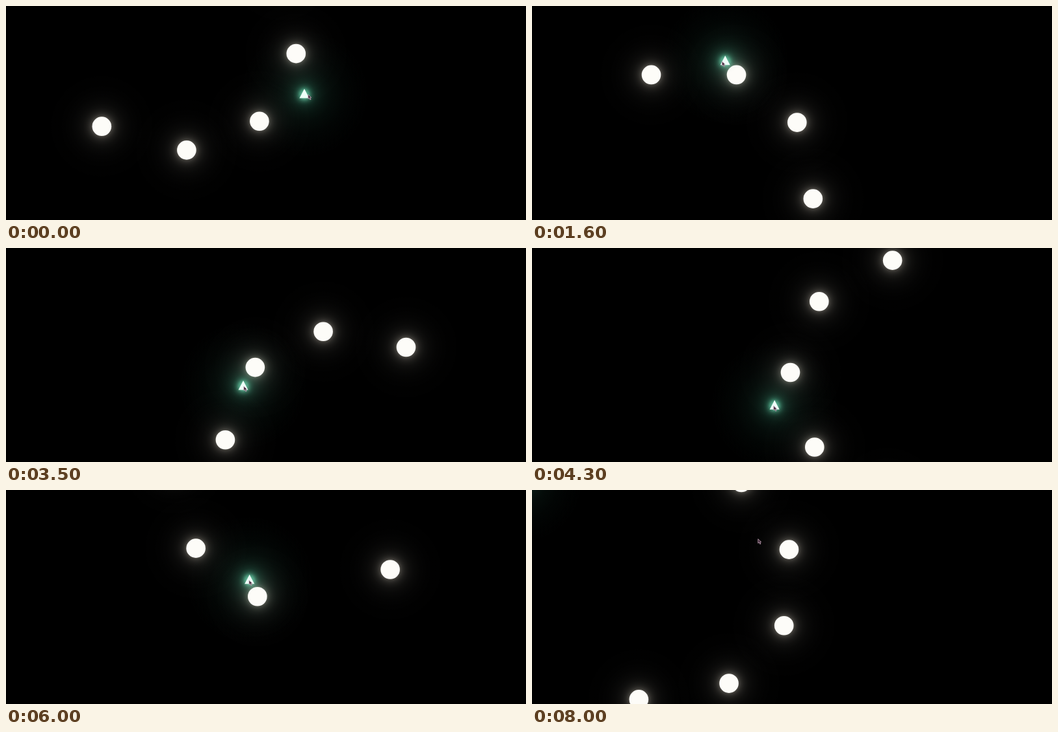
An HTML page with a canvas that plays this animation: 800 by 331 pixels, repeating every 8.1 s.

```html
<!DOCTYPE html>
<html lang="en">
<head>
<meta charset="utf-8">
<title>Orbs</title>
<style>
  html, body { margin: 0; width: 100%; height: 100%; overflow: hidden; background: #000; }
  canvas { display: block; width: 800px; height: 331px; }
</style>
</head>
<body>
<canvas id="stage" width="800" height="331"></canvas>
<script>
const ctx = document.getElementById('stage').getContext('2d');
const LOOP = 8100, STEP = 100;

// Orbs fly straight through one point, each turned a little from the last.
const CX = 400, CY = 168.5, RADIUS = 14.8;
const SPEED = 299, GAP = 0.4, TURN = 20;
const REACH_X = 256, REACH = 300;
const FIRST = { head: 116, time: 0.353, from: -3, to: 14 };
const SECOND = { head: 166.6, time: 6.656, from: 0, to: 6 };

// The ship follows the pointer until an orb knocks it away.
const AIM = [[0, 459, 136], [0.3, 484, 142], [1, 350, 76], [2.3, 274, 119],
  [3.5, 365, 213], [5.1, 369, 238], [6.7, 375, 64], [8.1, 348, 76]];
const KNOCK = 6.1, SLOWED = 6.3;

const rad = deg => deg * Math.PI / 180;

// smooth path through unevenly timed points
function aimAt(t) {
  let i = 0;
  while (i < AIM.length - 2 && t >= AIM[i + 1][0]) i++;
  const a = AIM[i], b = AIM[i + 1];
  const before = AIM[i - 1] || a, after = AIM[i + 2] || b;
  const d = b[0] - a[0], u = (t - a[0]) / d;
  return [1, 2].map(n => {
    const m0 = d * (b[n] - before[n]) / (b[0] - before[0]);
    const m1 = d * (after[n] - a[n]) / (after[0] - a[0]);
    const ease = u * u * (3 - 2 * u);
    return a[n] + (b[n] - a[n]) * ease + u * (u - 1) * ((u - 1) * m0 + u * m1);
  });
}

function shipAt(t) {
  const [x, y] = aimAt(Math.min(t, KNOCK)), s = Math.max(0, t - KNOCK);
  return [x - 208 * s, y - 23.5 * s - 26.7 * s * s];
}

function pointerAt(t) {
  return [aimAt(t + 0.06)[0] + 1, aimAt(t)[1] + 5];
}

function orbsAt(t) {
  const orbs = [];
  const lag = 9 * Math.exp(-(((t - 4) / 1.1) ** 2));
  for (const run of [FIRST, SECOND]) {
    for (let k = run.from; k <= run.to; k++) {
      const late = run === FIRST && k === run.to ? Math.max(0, t - SLOWED) : 0;
      const a = rad(run.head - TURN * k);
      const s = (t - late - run.time - GAP * k) * SPEED - lag;
      const x = Math.cos(a) * s - 129 * late, y = Math.sin(a) * s - 12 * late;
      if (Math.abs(x) < REACH_X && Math.abs(s) < REACH) orbs.push([CX + x, CY + y]);
    }
  }
  return orbs;
}

// light that fades with distance to the given power
function glow(x, y, r, rgb, gain, power) {
  const g = ctx.createRadialGradient(x, y, 0, x, y, r);
  for (let u = 0.05; u <= 1; u += 0.025) {
    g.addColorStop(u, `rgba(${rgb},${Math.min(0.6, gain * (1 - u) / u ** power)})`);
  }
  g.addColorStop(1, `rgba(${rgb},0)`);
  ctx.fillStyle = g;
  ctx.fillRect(x - r, y - r, 2 * r, 2 * r);
}

function shape(x, y, angle, points) {
  ctx.save();
  ctx.translate(x, y);
  ctx.rotate(angle);
  ctx.beginPath();
  points.forEach(p => ctx.lineTo(...p));
  ctx.closePath();
}

function drawShip([x, y], angle) {
  shape(x, y, angle, [[0, -8], [7.5, 6.5], [-7.5, 6.5]]);
  ctx.shadowColor = '#8ff0cc';
  ctx.shadowBlur = 10;
  ctx.fillStyle = '#eefff8';
  ctx.fill();
  ctx.restore();
}

function drawPointer([x, y]) {
  shape(x - 2, y - 4, 0, [[0, 0], [0, 6.5], [1.6, 5.2], [3, 8], [4.2, 7.4], [2.9, 4.8], [4.8, 4.6]]);
  ctx.fillStyle = '#3a2434';
  ctx.fill();
  ctx.lineWidth = 0.8;
  ctx.strokeStyle = '#c9a9bd';
  ctx.stroke();
  ctx.restore();
}

function draw(t) {
  ctx.globalCompositeOperation = 'source-over';
  ctx.fillStyle = '#000';
  ctx.fillRect(0, 0, 800, 331);

  const orbs = orbsAt(t), ship = shipAt(t);
  ctx.globalCompositeOperation = 'lighter';
  for (const [x, y] of orbs) glow(x, y, 90, '255,246,228', 0.0095, 2);
  glow(...ship, 100, '80,205,160', 0.042, 1);

  ctx.globalCompositeOperation = 'source-over';
  ctx.fillStyle = '#fdfcf8';
  for (const [x, y] of orbs) {
    ctx.beginPath();
    ctx.arc(x, y, RADIUS, 0, 2 * Math.PI);
    ctx.fill();
  }
  drawShip(ship, rad(Math.max(0, t - KNOCK) * 160));
  drawPointer(pointerAt(t));
}

const start = performance.now();
function tick() {
  const ms = (performance.now() - start) % LOOP;
  draw(Math.floor(ms / STEP) * STEP / 1000);
  requestAnimationFrame(tick);
}
tick();
</script>
</body>
</html>
```
